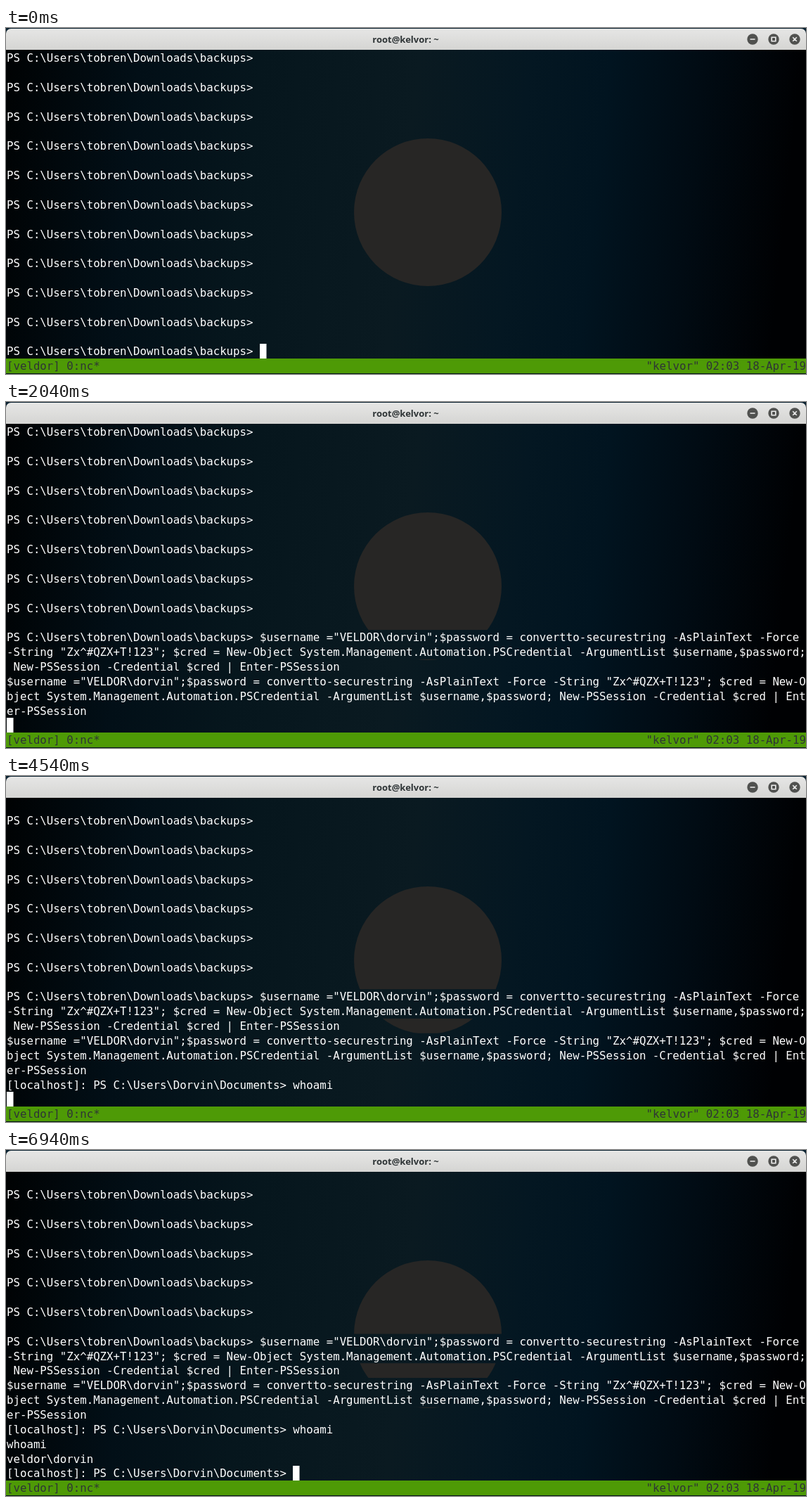
An HTML page with a canvas for the animation above (8 s loop, 1138 by 492 pixels).

```html
<!DOCTYPE html>
<html lang="en">
<head>
<meta charset="utf-8">
<title>Terminal</title>
<style>
  html, body { margin: 0; width: 100%; height: 100%; overflow: hidden; background: #000; }
  canvas { display: block; }
</style>
</head>
<body>
<canvas id="stage" width="1138" height="492"></canvas>
<script>
const ctx = document.getElementById('stage').getContext('2d');
const W = 1138, H = 492, LOOP = 8000;
const COLS = 120, ROWS = 21, CELL = 9.475, LINE = 20.85, LEFT = 1, BOTTOM = 470;
const MONO = '15.74px "DejaVu Sans Mono", monospace';

const prompt = 'PS C:\\Users\\tobren\\Downloads\\backups> ';
const remote = '[localhost]: PS C:\\Users\\Dorvin\\Documents> ';
const command = '$username ="VELDOR\\dorvin";$password = convertto-securestring -AsPlainText -Force ' +
  '-String "Zx^#QZX+T!123"; $cred = New-Object System.Management.Automation.PSCredential ' +
  '-ArgumentList $username,$password; New-PSSession -Credential $cred | Enter-PSSession';
const echoed = command.lastIndexOf('$passwor') + 8;

// [time, text added, cursor visible]
const events = [
  [0, (prompt + '\n\n').repeat(14) + prompt, true],
  [500, command.slice(0, 130), true],
  [570, command.slice(130), true],
  [640, '\n', true],
  [1170, command.slice(0, echoed), false],
  [2040, command.slice(echoed) + '\n', true],
  [2370, '', false],
  [2740, remote, false],
  [3000, '', true],
  [3570, '', false],
  [3620, 'w', false],
  [3670, '', true],
  [3840, 'h', true],
  [4000, 'o', true],
  [4100, 'a', true],
  [4240, 'm', true],
  [4300, 'i', true],
  [4540, '\n', true],
  [4900, 'whoami\n', true],
  [5140, 'veldor\\dorvin\n' + remote, false],
  [5900, '', true],
  [6440, '', false],
  [6940, '', true],
];

const backdrop = ctx.createLinearGradient(0, 31, 1120, 150);
[[0, '#000203'], [0.17, '#020f17'], [0.32, '#06161d'], [0.52, '#0a1a21'], [0.66, '#041722'],
 [0.76, '#011420'], [0.88, '#010b13'], [1, '#000103']]
  .forEach(([stop, color]) => backdrop.addColorStop(stop, color));

const titleBar = ctx.createLinearGradient(0, 1, 0, 31);
titleBar.addColorStop(0, '#e6e6e5');
titleBar.addColorStop(1, '#d5d5d3');

function rect(x, y, w, h, fill) {
  ctx.fillStyle = fill;
  ctx.fillRect(x, y, w, h);
}

function disc(x, y, r, fill) {
  ctx.fillStyle = fill;
  ctx.beginPath();
  ctx.arc(x, y, r, 0, 2 * Math.PI);
  ctx.fill();
}

function write(text, x, y, fill) {
  ctx.fillStyle = fill;
  ctx.fillText(text, x, y);
}

function wrap(text) {
  return text.split('\n').flatMap(line => line.match(new RegExp(`.{1,${COLS}}`, 'g')) || ['']);
}

function drawTitle() {
  rect(0, 0, W, 31, '#0b2231');
  ctx.fillStyle = titleBar;
  ctx.beginPath();
  ctx.roundRect(0, 1, W, 30, [7, 7, 0, 0]);
  ctx.fill();
  ctx.font = 'bold 13px "Open Sans", sans-serif';
  ctx.textAlign = 'center';
  write('root@kelvor: ~', 568.5, 21, '#2e3436');
  ctx.textAlign = 'left';

  for (const x of [1062, 1092, 1122]) disc(x, 16, 7.7, '#50514f');
  ctx.strokeStyle = '#eee';
  ctx.lineWidth = 1.6;
  ctx.stroke(new Path2D('M1058.5 16h7M1089.2 13.2h5.6v5.6h-5.6zM1119.2 13.2l5.6 5.6m0-5.6l-5.6 5.6'));
}

function drawStatus() {
  rect(0, BOTTOM, W, 21, '#4e9a06');
  rect(0, 491, W, 1, '#04131c');
  write('[veldor] 0:nc*', LEFT, BOTTOM + 16.2, '#2e3436');
  write('"kelvor" 02:03 18-Apr-19', LEFT + 96 * CELL, BOTTOM + 16.2, '#2e3436');
}

function drawTerminal(lines, cursor) {
  rect(0, 31, W, H - 31, backdrop);
  disc(600, 262, 105, '#272625');
  ctx.font = MONO;
  const rowTop = row => BOTTOM - (ROWS - row) * LINE;
  // Written cells cover the emblem behind them.
  lines.forEach((line, row) => rect(0, rowTop(row), LEFT + line.trimEnd().length * CELL, LINE, backdrop));
  lines.forEach((line, row) => write(line, LEFT, rowTop(row) + 16.2, '#fff'));
  if (cursor) {
    const column = lines[ROWS - 1].length;
    rect(Math.round(LEFT + column * CELL), 449, 9.5, 21, '#fff');
  }
  drawStatus();
}

function draw(now) {
  const time = now % LOOP;
  const past = events.filter(([start]) => start <= time);
  const lines = wrap(past.map(event => event[1]).join('')).slice(-ROWS);
  drawTerminal(lines, past[past.length - 1][2]);
  drawTitle();
  requestAnimationFrame(draw);
}
requestAnimationFrame(draw);
</script>
</body>
</html>
```
